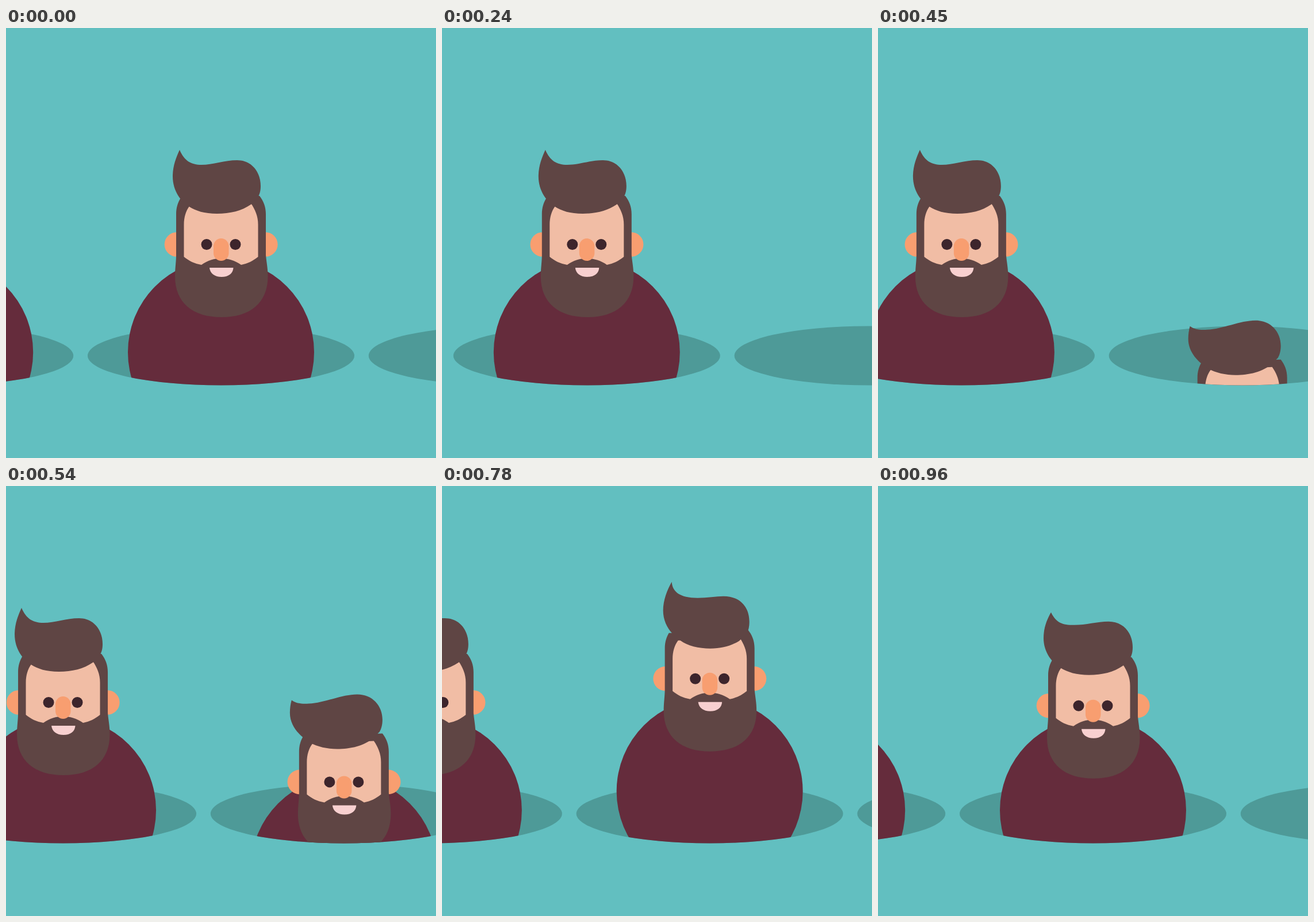
Animation, 748 px wide and 748 px high, one loop 0.99 s. Source, as an HTML page without scripts:

```html
<!DOCTYPE html>
<html lang="en">
<head>
<meta charset="utf-8">
<title>Pop-up beards</title>
<style>
@property --f { syntax: "<number>"; inherits: true; initial-value: 0; }

html, body { margin: 0; width: 100%; height: 100%; overflow: hidden; background: #62bfc0; }

svg {
  display: block; width: 100%; height: 100%;
  animation: tick 990ms steps(33) -2ms infinite;
}
/* --f counts 30 ms ticks; every position is computed from it */
@keyframes tick { from { --f: 0; } to { --f: 33; } }

.belt { transform: translateX(calc(var(--f) * -15.275px)); }

.hole { fill: #4e9a98; }
.shirt { fill: #652c3c; }
.hair { fill: #5f4544; }
.skin { fill: #f1bda5; }
.warm { fill: #f89e70; }
.eye { fill: #3d252c; }
.mouth { fill: #f8d0d0; }

/* decelerating rise, then a cosine drop; the head trails the body */
.pop .shirt {
  --up: max(0, 26 - var(--f));
  --down: min(1, max(0, (var(--f) - 26) / 5));
  transform: translateY(calc(-33px + 2.12px * var(--up) * var(--up) + 16.5px * (1 - cos(3.1416 * var(--down)))));
}
.pop .head {
  --up: max(0, 26.7 - var(--f));
  --down: max(0, (var(--f) - 26.7) / 4.8);
  transform: translateY(calc(-42.5px + 2.39px * var(--up) * var(--up) + 24.75px * (1 - cos(3.1416 * var(--down)))));
}

.quiff { d: path("M302 212C310 231 322 238 340 238C360 238 380 230 402 230C428 230 443 251 443 275C443 284 441 291 436 298L426 307C410 318 390 323 367 323C345 323 330 318 319 311C305 303 290 284 290 258C290 240 296 225 302 212Z"); }
.pop .quiff { animation: sway 990ms -2ms infinite; }
@keyframes sway {
  0%, 54.545% {
    animation-timing-function: steps(4);
    d: path("M283 234C291 240 302 241 313 240C340 239 370 224 397 224C424 224 441 244 441 268C441 277 439 284 436 289L427 298C410 314 385 319 362 319C345 319 328 315 315 308C298 297 280 280 280 256C280 248 281 241 283 234Z");
  }
  66.667% {
    animation-timing-function: steps(4);
    d: path("M290 225C296 234 306 238 325 238C350 238 375 227 399 227C426 227 441 250 441 275C441 281 440 288 436 294L425 303C410 315 390 320 367 320C345 320 330 316 317 309C300 299 284 282 284 256C284 245 286 235 290 225Z");
  }
  78.788% {
    animation-timing-function: steps(6);
    d: path("M308 208C309 225 322 236 353 236C370 236 385 233 398 233C428 233 443 253 443 277C443 285 442 293 437 300L425 311C410 320 395 324 375 324C355 324 335 319 323 310C308 300 293 282 293 258C293 240 300 222 308 208Z");
  }
  96.97%, 100% {
    d: path("M301 214C308 229 318 236 337 236C359 237 380 230 401 230C428 230 443 251 443 275C443 284 441 291 436 298L426 307C410 318 390 323 367 323C345 323 330 318 318 311C304 303 288 284 288 259C288 241 294 226 301 214Z");
  }
}
</style>
</head>
<body>
<svg viewBox="0 0 748 748">
  <defs>
    <clipPath id="rim"><path d="M142 0H606V570A232 51.5 0 0 1 142 570Z"/></clipPath>
    <ellipse id="hole" class="hole" cx="374" cy="570" rx="232" ry="51.5"/>
    <g id="face">
      <g class="warm">
        <circle cx="297" cy="376.5" r="21.3"/>
        <circle cx="451.3" cy="376.5" r="21.3"/>
      </g>
      <path class="hair" d="M303 297L441 292C448 301 452 311 452 324V395C453 407 455.500 418 455.500 432C455.500 478 425 503 375 503C325 503 294 478 294 432C294 418 296 407 296 395V324C296 312 299 304 303 297Z"/>
      <path class="skin" d="M319 310C313 318 309.500 329 309.500 342V398C318 405 328 410 340 412C351 404 362 401 374 401C386 401 398 404 409 412C420 410 430 405 438.500 398V342C438.500 327 433 315 426 305Z"/>
      <circle class="eye" cx="349" cy="376.500" r="9.500"/>
      <circle class="eye" cx="399" cy="376.500" r="9.500"/>
      <rect class="warm" x="361" y="366" width="26.500" height="39" rx="13.250"/>
      <path class="mouth" d="M354 417H395.500C395 427 387 433 375 433C363 433 355 427 354 417Z"/>
    </g>
    <g id="man" clip-path="url(#rim)">
      <circle class="shirt" cx="374" cy="564" r="162"/>
      <use href="#face"/>
      <path class="hair quiff"/>
    </g>
  </defs>
  <g class="belt">
    <use href="#hole" x="-488.8"/>
    <use href="#man" x="-488.8"/>
    <use href="#hole"/>
    <use href="#man"/>
    <g transform="translate(488.8)">
      <use href="#hole"/>
      <g class="pop" clip-path="url(#rim)">
        <circle class="shirt" cx="374" cy="564" r="162"/>
        <g class="head">
          <use href="#face"/>
          <path class="hair quiff"/>
        </g>
      </g>
    </g>
    <use href="#hole" x="977.6"/>
  </g>
</svg>
</body>
</html>
```
